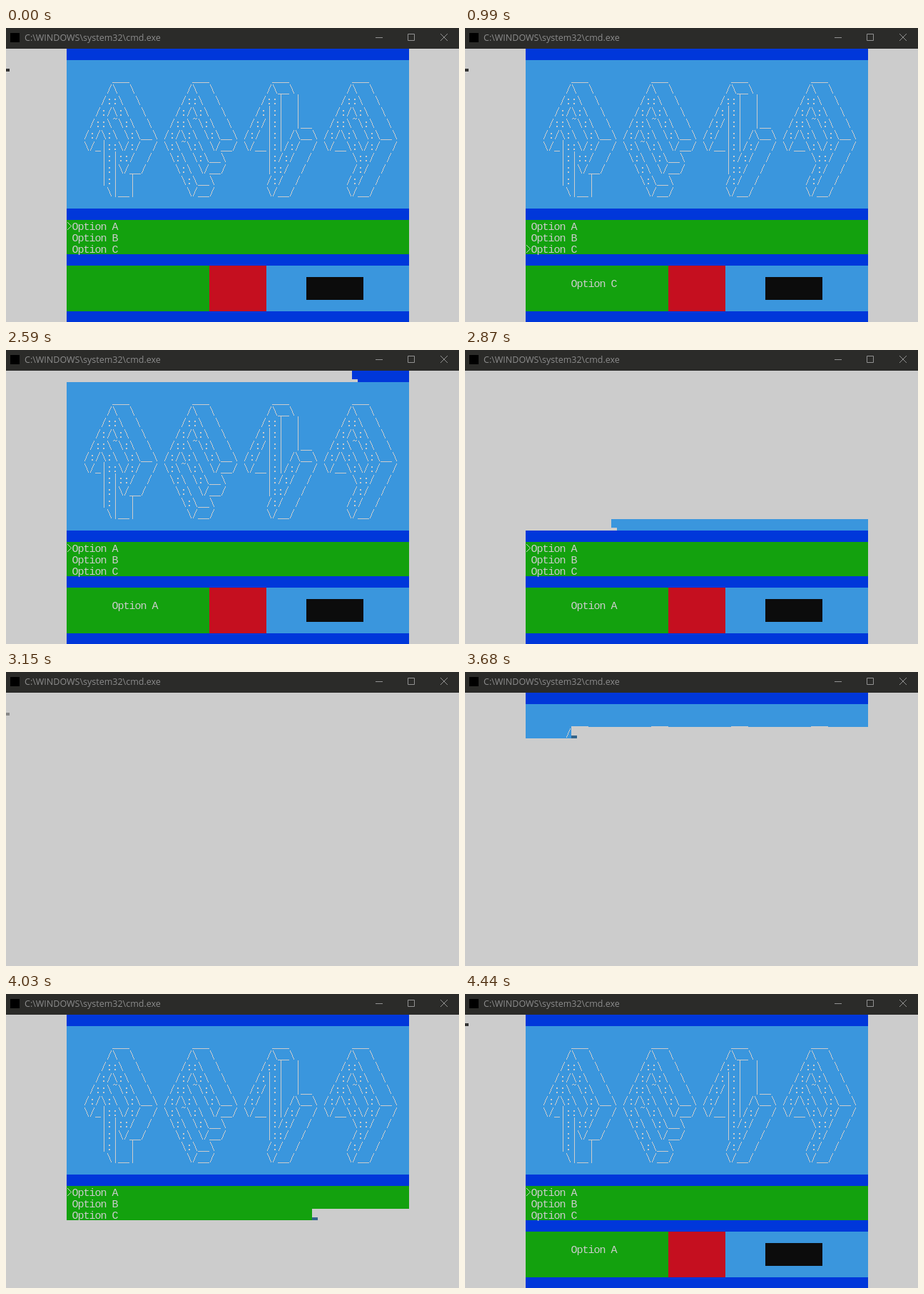
An HTML page with a canvas that plays this animation: 635 by 412 pixels, repeating every 4510 ms.

```html
<!DOCTYPE html>
<html lang="en">
<head>
<meta charset="utf-8">
<title>Console menu</title>
<style>
  html, body { margin: 0; width: 100%; height: 100%; overflow: hidden; background: #ccc; }
  canvas { display: block; }
</style>
</head>
<body>
<canvas id="stage" width="635" height="412"></canvas>
<script>
const ctx = document.getElementById('stage').getContext('2d');
const COLS = 60, ROWS = 24, CELL_W = 8, CELL_H = 16, LEFT = 85, TOP = 29;
const LOOP = 4510, STEP = 70;
const GREY = '#cccccc', BLUE = '#0037da', SKY = '#3a96dd', GREEN = '#13a10e',
      RED = '#c50f1f', BLACK = '#0c0c0c';

const roof = String.raw`
      ___
     /\  \
    /::\  \
   /:/\:\  \
  /::\~\:\  \
 /:/\:\ \:\__\
`.slice(1);

const letters = [
  roof + String.raw` \/_|::\/:/  /
    |:|::/  /
    |:|\/__/
    |:|  |
     \|__|`,
  roof + String.raw` \:\~\:\ \/__/
  \:\ \:\__\
   \:\ \/__/
    \:\__\
     \/__/`,
  String.raw`
      ___
     /\__\
    /::|  |
   /:|:|  |
  /:/|:|  |__
 /:/ |:| /\__\
 \/__|:|/:/  /
     |:/:/  /
     |::/  /
     /:/  /
     \/__/`.slice(1),
  roof + String.raw` \/__\:\/:/  /
      \::/  /
      /:/  /
     /:/  /
     \/__/`
];

function rect(color, x, y, w, h) {
  ctx.fillStyle = color;
  ctx.fillRect(x, y, w, h);
}

function background(row, col) {
  if (row > 0 && row < 14) return SKY;
  if (row > 14 && row < 18) return GREEN;
  if (row > 18 && row < 23) {
    if (col < 25) return GREEN;
    if (col < 35) return RED;
    return col >= 42 && col < 52 && (row === 20 || row === 21) ? BLACK : SKY;
  }
  return BLUE;
}

// Line characters are plotted on the 8 by 16 cell grid; the rest is type.
function glyph(ch, x, y) {
  const dot = (dx, dy, w = 1, h = 1) => ctx.fillRect(x + dx, y + dy, w, h);
  if (ch === '/' || ch === '\\') {
    for (let i = 0; i < 13; i++) {
      const dx = 6 - Math.round(i * 5 / 12);
      dot(ch === '/' ? dx : 7 - dx, i + 2);
    }
  } else if (ch === '|') dot(4, 0, 1, 16);
  else if (ch === '_') dot(0, 15, 8, 1);
  else if (ch === ':') { dot(3, 6, 2, 2); dot(3, 12, 2, 2); }
  else if (ch === '~') { dot(2, 1, 2, 1); dot(1, 2); dot(4, 2, 2, 1); dot(6, 1); }
  else if (ch === '>') for (let i = 0; i < 11; i++) dot(6 - Math.abs(i - 5), i + 3);
  else ctx.fillText(ch, x + 4, y + 14);
}

function makeGrid(selected, label) {
  const grid = Array.from({ length: ROWS }, () => Array(COLS).fill(' '));
  const put = (row, col, text) => [...text].forEach((ch, i) => { grid[row][col + i] = ch; });
  letters.forEach((art, i) =>
    art.split('\n').forEach((line, j) => put(2 + j, 2 + 14 * i, line)));
  [...'ABC'].forEach((name, i) =>
    put(15 + i, 0, (i === selected ? '>' : ' ') + 'Option ' + name));
  if (label) put(20, 8, 'Option ' + 'ABC'[selected]);
  return grid;
}

function drawCells(grid, from, to) {
  const each = paint => {
    for (let n = from; n < to; n++) {
      const row = Math.floor(n / COLS), col = n % COLS;
      paint(row, col, LEFT + col * CELL_W, TOP + row * CELL_H);
    }
  };
  each((row, col, x, y) => rect(background(row, col), x, y, CELL_W, CELL_H));
  ctx.fillStyle = GREY;
  ctx.font = '15px "Liberation Mono", monospace';
  ctx.textAlign = 'center';
  each((row, col, x, y) => { if (grid[row][col] !== ' ') glyph(grid[row][col], x, y); });
}

function cellCursor(n, color) {
  rect(color, LEFT + n % COLS * CELL_W, TOP + Math.floor(n / COLS) * CELL_H + 12, CELL_W, 4);
}

function homeCursor(row, color) {
  rect(color, 0, TOP + row * CELL_H + 12, 5, 4);
}

function drawTitleBar() {
  rect('#2b2b29', 0, 0, 635, 29);
  rect('#000', 6, 7, 13, 13);
  ctx.fillStyle = '#8c8c8c';
  ctx.font = '12.5px "Open Sans", sans-serif';
  ctx.textAlign = 'left';
  ctx.fillText('C:\\WINDOWS\\system32\\cmd.exe', 26, 18);
  ctx.strokeStyle = '#929292';
  ctx.lineWidth = 1;
  ctx.beginPath();
  ctx.moveTo(518, 13.5); ctx.lineTo(528, 13.5);
  ctx.rect(563.5, 8.5, 9, 9);
  ctx.moveTo(609, 8); ctx.lineTo(619, 18);
  ctx.moveTo(619, 8); ctx.lineTo(609, 18);
  ctx.stroke();
}

function drawScreen(t) {
  const total = COLS * ROWS;
  const steps = start => Math.floor((t - start) / STEP);
  const selected = t < 590 ? 0 : t < 990 ? 1 : t < 1390 ? 2 : t < 1860 ? 1 : 0;
  const grid = makeGrid(selected, t >= 590);

  if (t < 2590) {
    drawCells(grid, 0, total);
    if (t < 1390 || t >= 1460) homeCursor(1, '#333');
  } else if (t < 3150) {
    const erased = Math.min(1318, Math.floor(50 + 186.25 * steps(2590)));
    drawCells(grid, erased, total);
    cellCursor(erased, GREY);
  } else if (t < 3610) {
    homeCursor(1, '#888');
  } else if (t < 4240) {
    const drawn = 13 + 175 * steps(3610);
    drawCells(grid, 0, drawn);
    cellCursor(drawn, '#34648a');
  } else {
    drawCells(grid, 0, total);
    homeCursor(t < 4440 ? 1 : 0, '#333');
  }
}

const start = performance.now();
function frame() {
  rect(GREY, 0, 0, 635, 412);
  drawScreen((performance.now() - start) % LOOP);
  drawTitleBar();
  requestAnimationFrame(frame);
}
frame();
</script>
</body>
</html>
```
